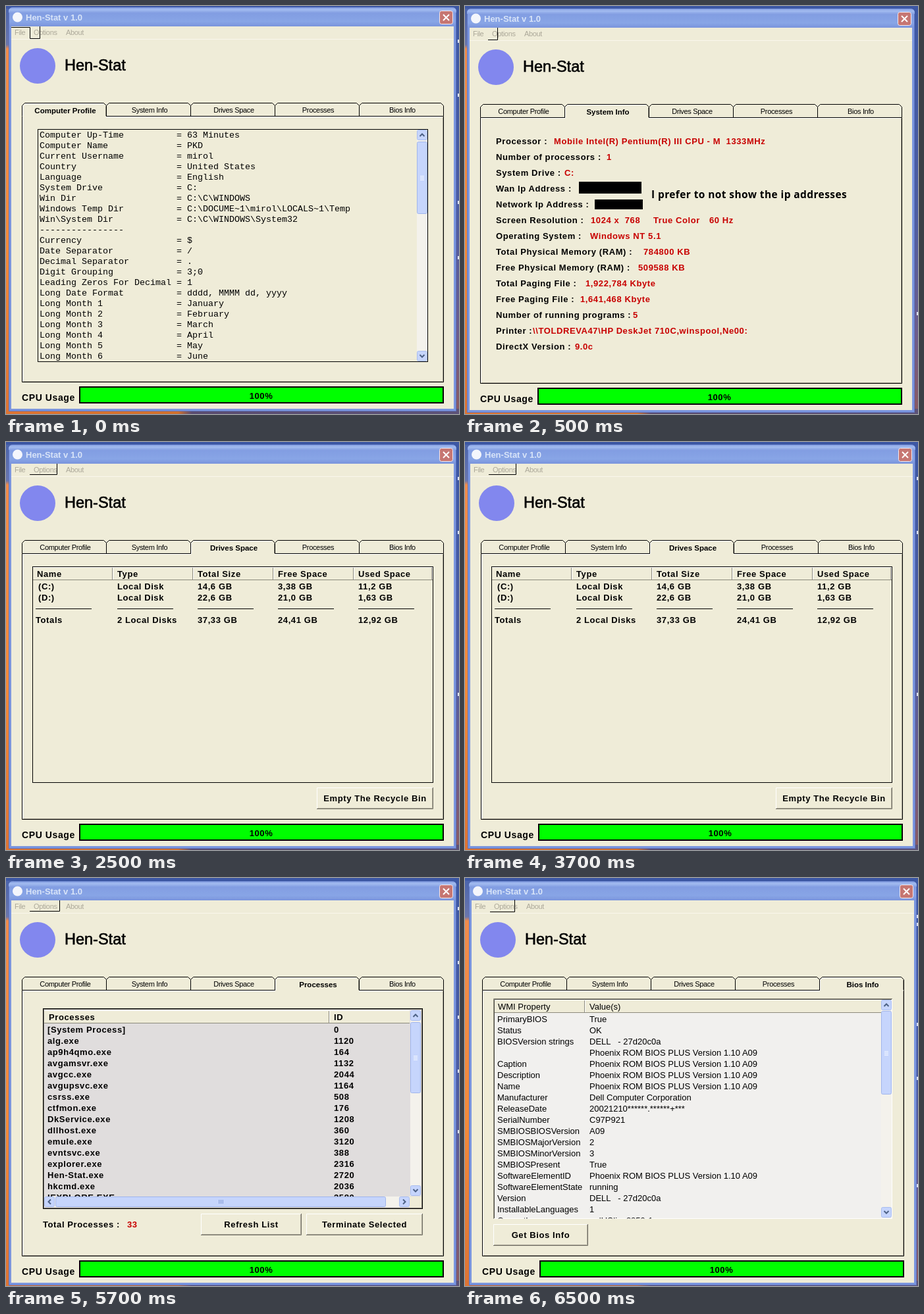
Write an HTML page that moves like this. It is 688 by 620 pixels and loops after 8 s.

```html
<!DOCTYPE html>
<html lang="en">
<head>
<meta charset="utf-8">
<title>Hen-Stat v 1.0</title>
<style>
html, body { margin: 0; width: 100%; height: 100%; overflow: hidden; background: #4a68b0; }
svg { display: block; width: 688px; height: 620px; }
text { font-family: "Liberation Sans", Arial, sans-serif; fill: #000; }
.title { font-size: 13px; font-weight: bold; fill: #d8e4f8; }
.small { font-size: 11px; letter-spacing: -.33px; }
.menu { font-size: 11px; letter-spacing: -.33px; fill: #aca899; }
.tab { font-size: 11.5px; font-weight: bold; }
.head { font-size: 23.5px; stroke: #000; stroke-width: .6px; }
.bold { font-size: 13px; font-weight: bold; letter-spacing: .6px; }
.red { fill: #c80000; }
.cpu { font-size: 14px; font-weight: bold; letter-spacing: .6px; }
.plain { font-size: 13px; }
.mono { font-family: "Liberation Mono", "Courier New", monospace; font-size: 13.333px; }
.note { font-family: "Open Sans", sans-serif; font-size: 15.5px; font-weight: 700; letter-spacing: .4px; }
.mid { text-anchor: middle; }
</style>
</head>
<body>
<svg id="stage" viewBox="0 0 688 620" xmlns="http://www.w3.org/2000/svg"></svg>
<script>
const FACE = '#efecd8';
const APP = 'Hen-Stat';

// ---- drawing helpers ----
const rect = (x, y, w, h, fill, extra = '') =>
  `<rect x="${x}" y="${y}" width="${w}" height="${h}" fill="${fill}" ${extra}/>`;
const box = (x, y, w, h, fill, line = '#000', r = 0) =>
  rect(x + .5, y + .5, w - 1, h - 1, fill, `stroke="${line}" rx="${r}"`);
const path = (d, stroke, w = 1, fill = 'none') =>
  `<path d="${d}" fill="${fill}" stroke="${stroke}" stroke-width="${w}"/>`;
const text = (x, y, s, cls) =>
  `<text x="${x}" y="${y}" class="${cls}">${s.replace(/ {2,}/g, m => '\u00a0'.repeat(m.length))}</text>`;
const clip = (id, x, y, w, h, body) =>
  `<clipPath id="${id}">${rect(x, y, w, h, '#000')}</clipPath><g clip-path="url(#${id})">${body}</g>`;

function button(x, y, w, h, label) {
  return rect(x, y, w, h, FACE) +
    path(`M${x + .5} ${y + h - 1}V${y + .5}H${x + w - 1}`, '#fff') +
    path(`M${x} ${y + h - .5}H${x + w - .5}V${y}`, '#716f64') +
    path(`M${x + 1} ${y + h - 1.5}H${x + w - 1.5}V${y + 1}`, '#aca899') +
    text(x + w / 2, y + h / 2 + 4.5, label, 'bold mid');
}

// angle: 0 up, 90 right, 180 down, 270 left
function arrow(x, y, angle) {
  return box(x, y, 16, 16, '#c6d5fc', '#a9bdf0', 2) +
    `<g transform="translate(${x + 8} ${y + 8}) rotate(${angle})">${path('M-3.5 2L0 -1.5L3.5 2', '#4d6185', 2)}</g>`;
}

function vScroll(x, y, h, top, size) {
  const mid = top + size / 2;
  let s = rect(x, y, 16, h, '#f4f2ec') + arrow(x, y, 0) + arrow(x, y + h - 16, 180) +
    box(x, top, 16, size, '#c6d5fc', '#a0b5ec', 2);
  for (let i = -3; i <= 3; i += 2) s += rect(x + 5, Math.round(mid) + i, 6, 1, '#eef3ff');
  return s;
}

function hScroll(x, y, w, left, size) {
  const mid = left + size / 2;
  let s = rect(x, y, w, 16, '#f4f2ec') + arrow(x, y, 270) + arrow(x + w - 16, y, 90) +
    box(left, y, size, 16, '#c6d5fc', '#a0b5ec', 2);
  for (let i = -3; i <= 3; i += 2) s += rect(Math.round(mid) + i, y + 5, 1, 6, '#8ea4dc');
  return s;
}

// header strip; cols = [[separator x, label], ...]
function header(x, y, w, cols, cls) {
  return rect(x, y, w, 20, FACE) + path(`M${x} ${y + 19.5}H${x + w}`, '#8c8a7c') +
    path(`M${x} ${y + .5}H${x + w}`, '#fff') +
    cols.map(([cx, label]) =>
      (cx > x ? path(`M${cx - .5} ${y + 1}v18`, '#8c8a7c') + path(`M${cx + .5} ${y + 1}v18`, '#fff') : '') +
      text(cx + 7, y + 15, label, cls)).join('');
}

// ---- window frame ----
const TABS = ['Computer Profile', 'System Info', 'Drives Space', 'Processes', 'Bios Info'];

function chrome(on) {
  let s = `<path d="M4 616V9Q4 2 11 2H677Q684 2 684 9V616Z" fill="#7b96df"/>` +
    `<path d="M4 31V9Q4 2 11 2H677Q684 2 684 9V31Z" fill="url(#bar)"/>` +
    rect(8, 31, 672, 581, FACE) +
    path('M4.5 616V10M683.5 10V616M4 615.5H684', '#6078c4') +
    `<circle cx="17.5" cy="17" r="7.5" fill="#f4f6fc"/>` +
    text(30, 22, APP + ' v 1.0', 'title') +
    box(658, 7, 21, 21, '#c67672', '#f4e8ee', 3) +
    path('M664 13L673 22M673 13L664 22', '#fff', 2) +
    path('M8 50.5H680', '#f9f7ec') +
    text(13, 44, 'File', 'menu') + text(42, 44, 'Options', 'menu') + text(91, 44, 'About', 'menu') +
    `<circle cx="48" cy="91" r="27" fill="#8287ee"/>` +
    text(89, 98, APP, 'head');
  s += rect(24, 167, 641, 405, FACE) +
    path('M24.5 167.5H664.5V571.5H24.5Z', '#000') +
    path('M663.5 169V570.5H26', '#aca899') + path('M25.5 570V168.5H662', '#fff');
  TABS.forEach((name, i) => {
    const x = 24.5 + i * 128, sel = i === on;
    if (sel) s += rect(x + .5, 148, 127, 21, FACE);
    s += path(`M${x} 167V151.5l4 -4H${x + 124}l4 4V167`, '#000', 1, FACE);
    if (sel) s += path(`M${x + 1} 168V152l4 -3.5H${x + 123}`, '#fff') + path(`M${x + 127} 152V167`, '#8c8a7c');
    s += text(x + 65.5, sel ? 163 : 162, name, (sel ? 'tab' : 'small') + ' mid');
  });
  return s + text(24, 600, 'CPU Usage', 'cpu') +
    rect(112, 579, 552, 24, '#0f0', 'stroke="#000" stroke-width="2"') +
    text(387.5, 596.5, '100%', 'bold mid');
}

// ---- pages ----
function profilePage() {
  const rows = [
    ['Computer Up-Time', '63 Minutes'], ['Computer Name', 'PKD'], ['Current Username', 'mirol'],
    ['Country', 'United States'], ['Language', 'English'], ['System Drive', 'C:'],
    ['Win Dir', 'C:\\C\\WINDOWS'], ['Windows Temp Dir', 'C:\\DOCUME~1\\mirol\\LOCALS~1\\Temp'],
    ['Win\\System Dir', 'C:\\C\\WINDOWS\\System32'], ['----------------'],
    ['Currency', '$'], ['Date Separator', '/'], ['Decimal Separator', '.'], ['Digit Grouping', '3;0'],
    ['Leading Zeros For Decimal', '1'], ['Long Date Format', 'dddd, MMMM dd, yyyy'],
    ...['January', 'February', 'March', 'April', 'May', 'June'].map((m, i) => ['Long Month ' + (i + 1), m])
  ];
  return box(48, 187, 593, 354, FACE) +
    rows.map(([k, v], i) => text(51, 200 + i * 16, k, 'mono') +
      (v ? text(259, 200 + i * 16, '= ' + v, 'mono') : '')).join('') +
    vScroll(624, 188, 352, 206, 110);
}

function systemPage() {
  const rows = [
    ['Processor :', 136, 'Mobile Intel(R) Pentium(R) III CPU - M  1333MHz'],
    ['Number of processors :', 216, '1'], ['System Drive :', 152, 'C:'],
    ['Wan Ip Address :'], ['Network Ip Address :'],
    ['Screen Resolution :', 192, '1024 x  768'], ['Operating System :', 191, 'Windows NT 5.1'],
    ['Total Physical Memory (RAM) :', 272, '784800 KB'], ['Free Physical Memory (RAM) :', 264, '509588 KB'],
    ['Total Paging File :', 184, '1,922,784 Kbyte'], ['Free Paging File :', 176, '1,641,468 Kbyte'],
    ['Number of running programs :', 256, '5'],
    ['Printer :', 104, '\\\\TOLDREVA47\\HP DeskJet 710C,winspool,Ne00:'],
    ['DirectX Version :', 168, '9.0c']
  ];
  return rows.map(([k, x, v], i) => text(48, 208 + i * 24, k, 'bold') +
      (v ? text(x, 208 + i * 24, v, 'bold red') : '')).join('') +
    text(287, 328, 'True Color', 'bold red') + text(372, 328, '60 Hz', 'bold red') +
    rect(174, 265, 95, 18, '#000') + rect(198, 292, 73, 15, '#000') +
    text(284, 290, 'I prefer to not show the ip addresses', 'note');
}

function drivesPage() {
  const xs = [45, 169, 291, 413, 535];
  const row = (y, cells, indent = 0) =>
    cells.map((c, i) => text(xs[i] + (i ? 0 : indent), y, c, 'bold')).join('');
  return box(40, 187, 609, 329, FACE) +
    header(41, 188, 607, [[40, 'Name'], [162, 'Type'], [284, 'Total Size'], [406, 'Free Space'], [528, 'Used Space'], [647, '']], 'bold') +
    row(222, ['(C:)', 'Local Disk', '14,6 GB', '3,38 GB', '11,2 GB'], 4) +
    row(239, ['(D:)', 'Local Disk', '22,6 GB', '21,0 GB', '1,63 GB'], 4) +
    xs.map(x => rect(x, 251, 85, 1, '#000')).join('') +
    row(273, ['Totals', '2 Local Disks', '37,33 GB', '24,41 GB', '12,92 GB']) +
    button(472, 523, 177, 33, 'Empty The Recycle Bin');
}

function processPage() {
  const rows = ('[System_Process] 0|alg.exe 1120|ap9h4qmo.exe 164|avgamsvr.exe 1132|avgcc.exe 2044|' +
    'avgupsvc.exe 1164|csrss.exe 508|ctfmon.exe 176|DkService.exe 1208|dllhost.exe 360|emule.exe 3120|' +
    'evntsvc.exe 388|explorer.exe 2316|' + APP + '.exe 2720|hkcmd.exe 2036|IEXPLORE.EXE 3580').split('|');
  const list = rows.map((r, i) => {
    const [name, id] = r.split(' '), y = 231.5 + i * 17;
    return text(63, y, name.replace('_', ' '), 'bold') + text(498, y, id, 'bold');
  }).join('');
  return box(56, 195, 577, 305, '#e0dddd') + box(57, 196, 575, 303, '#e0dddd', '#77756c') +
    header(58, 198, 555, [[58, 'Processes'], [491, 'ID']], 'bold') +
    clip('procs', 58, 218, 555, 263, list) +
    rect(613, 481, 18, 17, FACE) +
    vScroll(614, 198, 282, 216, 108) + hScroll(58, 481, 555, 75, 502) +
    text(56, 527.5, 'Total Processes :', 'bold') + text(184, 527.5, '33', 'bold red') +
    button(296, 507, 153, 33, 'Refresh List') + button(456, 507, 177, 33, 'Terminate Selected');
}

function biosPage() {
  const rom = 'Phoenix ROM BIOS PLUS Version 1.10 A09', ver = 'DELL   - 27d20c0a';
  const rows = [
    ['PrimaryBIOS', 'True'], ['Status', 'OK'], ['BIOSVersion strings', ver], ['', rom],
    ['Caption', rom], ['Description', rom], ['Name', rom], ['Manufacturer', 'Dell Computer Corporation'],
    ['ReleaseDate', '20021210******.******+***'], ['SerialNumber', 'C97P921'], ['SMBIOSBIOSVersion', 'A09'],
    ['SMBIOSMajorVersion', '2'], ['SMBIOSMinorVersion', '3'], ['SMBIOSPresent', 'True'],
    ['SoftwareElementID', rom], ['SoftwareElementState', 'running'], ['Version', ver],
    ['InstallableLanguages', '1'], ['CurrentLanguage', 'en|US|iso8859-1']
  ];
  const list = rows.map(([k, v], i) =>
    text(47, 215.5 + i * 17, k, 'plain') + text(187, 215.5 + i * 17, v, 'plain')).join('');
  return rect(41, 180, 606, 335, '#f1f0ee') +
    path('M41.5 515V180.5H647', '#8c8a7c') + path('M42.5 514V181.5H646', '#55534b') +
    path('M42 514.5H646.5V181', '#fff') +
    header(43, 182, 587, [[41, 'WMI Property'], [180, 'Value(s)']], 'plain') +
    clip('bios', 43, 202, 587, 312.5, list) +
    vScroll(630, 182, 331, 199, 127) +
    button(41, 523, 144, 33, 'Get Bios Info');
}

// ---- scenes: start time, window shift, menu outline, marks on the right edge ----
const SCENES = [
  { at: 0, dx: 0, dy: 0, page: profilePage, menu: 'M8 32.5H36.5V49.5H51.5V31', marks: [53, 135, 298, 382] },
  { at: 500, dx: -1, dy: 2, page: systemPage, menu: 'M35 51.5H49.5V33', marks: [467] },
  { at: 2500, dx: 0, dy: 2, page: drivesPage, menu: 'M36 49.5H77.5V33', marks: [55, 137, 383] },
  { at: 4500, dx: 0, dy: 3, page: processPage, menu: 'M36 50.5H81.5V34', marks: [46, 128, 211, 293, 385] },
  { at: 6500, dx: 2, dy: 3, page: biosPage, menu: 'M38 51.5H75.5V33', marks: [58, 70, 222, 304, 467] }
];
const LOOP = 8000;

const stops = list => list.map(([o, c]) => `<stop offset="${o}" stop-color="${c}"/>`).join('');
const defs = `<defs>
<linearGradient id="bar" x2="0" y2="1">${stops([[0, '#7d97de'], [.12, '#a3bcf0'], [.3, '#829de2'], [.75, '#88a5e6'], [1, '#7a94dc']])}</linearGradient>
<linearGradient id="left" x2="0" y2="1">${stops([[0, '#4a64ac'], [.095, '#6a76ac'], [.105, '#f08c4c'], [.6, '#f28a3a'], [1, '#dc7434']])}</linearGradient>
<linearGradient id="right" x2="0" y2="1">${stops([[0, '#3c57a4'], [.5, '#4c5ca2'], [.8, '#6c5c8c'], [1, '#8a5a60']])}</linearGradient>
<linearGradient id="foot">${stops([[0, '#dc7434'], [.38, '#d0702e'], [.41, '#5a4c70'], [1, '#5c5278']])}</linearGradient>
</defs>`;

const desktop = rect(0, 0, 688, 620, '#3f5aa6') + rect(0, 0, 12, 620, 'url(#left)') +
  rect(676, 0, 12, 620, 'url(#right)') + rect(0, 612, 688, 8, 'url(#foot)') + rect(0, 0, 688, 4, '#3c57a4');

const stage = document.getElementById('stage');
stage.innerHTML = defs + desktop + SCENES.map((s, i) =>
  `<g class="scene" display="none">${s.marks.map(y => rect(686, y - 2, 2, 5, '#dfe4f4')).join('')}` +
  `<g transform="translate(${s.dx} ${s.dy})">${chrome(i)}${s.page()}</g>${path(s.menu, '#000')}</g>`).join('');

const groups = [...stage.querySelectorAll('.scene')];
let shown = -1;
function tick() {
  const t = performance.now() % LOOP;
  const now = SCENES.filter(s => s.at <= t).length - 1;
  if (now !== shown) {
    groups.forEach((g, i) => g.setAttribute('display', i === now ? 'inline' : 'none'));
    shown = now;
  }
  requestAnimationFrame(tick);
}
tick();
</script>
</body>
</html>
```
